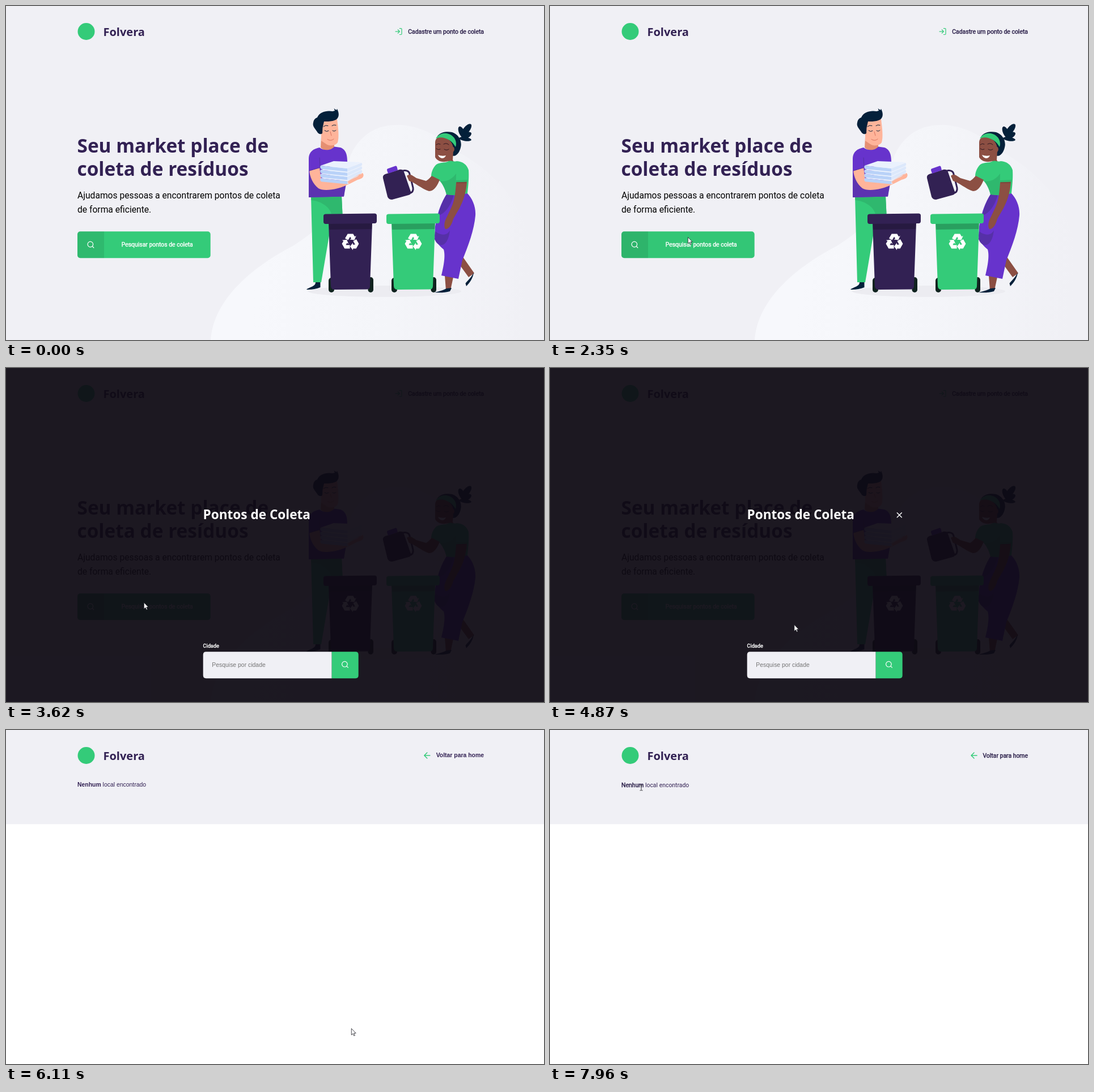
These frames come from a looping animation (949 by 590 pixels, 8000 ms). An HTML page:

```html
<!DOCTYPE html>
<html lang="pt-BR">
<head>
<meta charset="utf-8">
<title>Pontos de coleta</title>
<style>
html, body { margin: 0; width: 100%; height: 100%; overflow: hidden; background: #f0f0f5; }
svg { display: block; width: 100vw; height: 100vh; }
text { font: 10.43px Roboto, sans-serif; }
.title { font-family: "Open Sans", "Noto Sans", sans-serif; font-weight: 700; fill: #322153; }
.semi { stroke-width: .4px; }
.ink { fill: #322153; }
.link { fill: #261a45; stroke: #261a45; }
.white { fill: #fff; stroke: #fff; }
.arial, .arial text { font-family: "Liberation Sans", Arial, sans-serif; }
.end { text-anchor: end; }
.bold { font-weight: 700; }
.icon { fill: none; stroke-width: 2; stroke-linecap: round; stroke-linejoin: round; }
.face { fill: none; stroke-width: 1; stroke-linecap: round; }
</style>
</head>
<body>
<svg viewBox="0 0 949 590" preserveAspectRatio="none">
<defs>
  <linearGradient id="mist" gradientUnits="userSpaceOnUse" x1="440" y1="430" x2="925" y2="450">
    <stop offset="0" stop-color="#f7f8fc"/><stop offset=".5" stop-color="#f4f5f9"/><stop offset="1" stop-color="#f0f0f5"/>
  </linearGradient>
  <path id="turn" d="M-9.5-6.5-4.8-14.5H4.8L7.6-9.7 10.2-11 7-3.4-1.2-4.4 1.6-6-.4-9.6-4-3.4Z"/>
  <g id="recycle" fill="#fff">
    <use href="#turn"/><use href="#turn" transform="rotate(120)"/><use href="#turn" transform="rotate(240)"/>
  </g>
  <g id="bin">
    <g fill="#10231f"><rect x="569" y="480" width="10" height="26" rx="5"/><rect x="638.500" y="479" width="9.500" height="27" rx="4.700"/></g>
    <path d="M569 383 646 383 642 495Q642 500.500 636 500.500L580 501Q573.500 501 573 495Z"/>
    <path d="M569.500 384H645.500L645.200 394 570 395Z" fill="#000" fill-opacity=".22"/>
    <path d="M564 367.500 650 366.500Q654 366.500 654 370V380Q654 384 650 384L564 385Q560 385 560 381V371Q560 367.500 564 367.500Z"/>
    <use href="#recycle" x="607.500" y="417"/>
  </g>
  <path id="search" d="M11 3a8 8 0 1 0 0 16a8 8 0 0 0 0-16M21 21l-4.350-4.350"/>
  <g id="brand">
    <circle cx="141.500" cy="45" r="15" fill="#34cb79"/>
    <text class="title" x="171.500" y="53" style="font-size:20px">Folvera</text>
  </g>
</defs>

<g id="home">
  <rect width="949" height="590" fill="#f0f0f5"/>
  <path fill="url(#mist)" d="M361 590C366 520 430 465 500 427C600 372 588 300 612 255C632 222 658 210 692 210C745 212 770 240 805 262C870 300 905 350 920 400C945 480 925 540 908 590Z"/>
  <use href="#brand"/>
  <path class="icon" stroke="#34cb79" transform="translate(685.200 37.700) scale(.61)" d="M15 3h4a2 2 0 0 1 2 2v14a2 2 0 0 1-2 2h-4M10 17l5-5-5-5M15 12H3"/>
  <text class="link semi end" x="843" y="48.500">Cadastre um ponto de coleta</text>
  <g class="title" style="font-size:33.400px">
    <text class="title" x="125.500" y="259" style="font-size:33.400px">Seu market place de</text>
    <text class="title" x="125.500" y="300" style="font-size:33.400px">coleta de resíduos</text>
  </g>
  <text x="126" y="340" style="font-size:15.650px">Ajudamos pessoas a encontrarem pontos de coleta</text>
  <text x="126" y="364.800" style="font-size:15.650px">de forma eficiente.</text>
  <rect id="button" x="126" y="398.300" width="234.700" height="46.900" rx="5"/>
  <path d="M131 398.300H173V445.200H131Q126 445.200 126 440.200V403.300Q126 398.300 131 398.300Z" fill-opacity=".09"/>
  <use href="#search" class="icon" stroke="#fff" transform="translate(142.200 414.400) scale(.6)"/>
  <text class="white semi" x="266.700" y="425" text-anchor="middle">Pesquisar pontos de coleta</text>

  <ellipse cx="668" cy="504" rx="135" ry="10" fill="#ececf1"/>

  <!-- man -->
  <path fill="#34cb79" d="M538 335H592L595 400H571L556 488H542Z"/>
  <path fill="#2fb86e" d="M538 336H592L593.500 367H574C570 354 556 345 538.500 343Z"/>
  <path fill="#04203a" d="M546 488H554.500V497C547 500 538 501.500 530 501C535 496 546 496 546 488Z"/>
  <path fill="#e58f72" d="M556 232H579V250C574 257 561 257 555 250Z"/>
  <path fill="#ffb49a" d="M556 201 584 200C586 215 588 232 585 241C582 247 570 248 565 244L556 238Z"/>
  <path fill="#6733cc" d="M553 250C543 252 534 257 534 270V338L596 336.500 602 275C602 260 598 253 590 250L579 248.500C573 256 560 256 553 250Z"/>
  <path fill="#5c33b0" d="M535 296C545 318 570 325 600 314L596 336.500 534 338Z"/>
  <path fill="#04203a" d="M550 224C546 217 540 213 542 206C543 200 546 198 549 197C553 187 566 184 576 186L580 185 578.500 181 583 184 584 181.500C586 186 588 191 586 196C583 204 571 204 561 204L558.500 215 558 225Q554 228 550 224Z"/>
  <g class="face" stroke="#04203a"><path d="M560 213Q564 209.500 568 211.500M575 211.500Q578 209 582 210.500M562 220Q565.500 223 569 220.500M576 220Q579 222.500 582 219.500"/>
    <path stroke="#d9735f" d="M567 235.500Q573 239.500 578 235M572 222 574 229"/></g>
  <path fill="#ffb49a" d="M535 290 553 285 556 307C570 312 590 310 605 303L629 295C633 302 628 305 620 307L606 314C585 325 560 328 551 322C541 314 536 302 535 290Z"/>
  <path fill="#6733cc" d="M534 272 554 268 556 284.500 535 291.500Z"/>
  <path class="face" stroke="#5330a3" d="M535 291 554 285.500M553 268 554 284"/>
  <g id="towels"></g>
  <path fill="#ffb49a" d="M602 311C610 304 620 303 623 298L630 296C632 302 627 305 621 306L606 314Z"/>

  <!-- woman -->
  <path fill="#8c4f43" d="M805 442 826 472 816 479 800 457ZM774 476 789 479 784 502H776Z"/>
  <path fill="#04203a" d="M756 506C764 504 772 502 777 499L786 498 783 504C775 506.500 765 506.500 756 506ZM825 471C824 480 818 489 812 495L810.500 490C814 485 819 482 825 471Z"/>
  <path fill="#6733cc" d="M777 333 813 330C823 340 829 355 828 370C826 395 815 425 805 449L798 482 768 476C773 455 775 440 772 430C762 422 757 414 756 406L757 390C760 366 769 345 777 333Z"/>
  <path fill="#5630a8" d="M777 333 790 332.500C786 350 776 366 763 370C765 355 771 343 777 333ZM783 396C779 405 768 407 757 398L756 412C764 430 780 425 783 396Z"/>
  <g fill="#04203a">
    <path d="M760 232C764 223 776 221 787 223C799 227 805 239 802 250C799 262 792 267 786 264Z"/>
    <ellipse cx="812" cy="219" rx="13" ry="5.500" transform="rotate(-52 812 219)"/>
    <ellipse cx="804" cy="223" rx="11" ry="5" transform="rotate(66 804 223)"/>
    <ellipse cx="812" cy="229" rx="10" ry="5" transform="rotate(-30 812 229)"/>
    <ellipse cx="810" cy="235" rx="11" ry="3.500" transform="rotate(8 810 235)"/>
  </g>
  <path fill="#8c4f43" d="M757 242C757 234 762 230 770 231C785 235 790 245 789 257L788 272 794 282 778 284 781 274C770 277 760 274 757 267Z"/>
  <path fill="#34cb79" d="M758 234C763 226 772 223 781 226C792 230 796 240 793 249C790 244 787 240 782 237C774 232 766 231 758 234Z"/>
  <path fill="#8c4f43" d="M785 249Q791 247 791 254Q789 260 785 258Z"/>
  <g class="face" stroke="#2c1720"><path d="M759 245Q762 242 766 244M772 244Q777 241 781 245M759 252Q762 255 766 253M773 253Q777 256 781 253"/></g>
  <path fill="#fff" d="M762 263Q769 266 776 264Q774 269 769 269Q764 268 762 263Z"/>
  <path fill="#34cb79" d="M781 274C785 272 790 276 795 274C806 275 813 280 816 290C817 305 815 320 814 331Q795 336 777 333C775 324 771 316 766 310C763 307 757 305 750 301C750 293 754 285 758 281C765 275 774 278 781 274Z"/>
  <path fill="#2fb86e" d="M766 309C779 312 789 303 794 296L793 334 777 333C775 324 771 316 766 309Z"/>

  <!-- jug -->
  <path fill="#322153" d="M669 297 694 289Q700 288 702 293L714 328Q715 333 710 334L681 342Q675 342 673 337L665 304Q664 299 669 297Z"/>
  <path fill="none" stroke="#322153" stroke-width="3" d="M697 292C704 289 710 291 711.500 295L718 321C719 327 716 330 711 331"/>
  <path fill="#6733cc" d="M673 287.500 687 282.500Q689 282 689.500 284L691 290 674 296 672 290Q671.500 288.500 673 287.500Z"/>

  <path fill="#8c4f43" d="M751 300 765 307C760 320 754 327 746 327C733 323 722 312 711 309L707 300C714 295 718 301 724 304L741 309C746 306 748 303 751 300ZM794 311 813 310C812 330 806 345 800 357L789 376C786 388 780 395 775 394C772 390 773 381 777 374L786 355C792 342 793 325 794 311Z"/>
  <path fill="#2fb86e" d="M794 308 814 307V310.500L794 311.500Z"/>
  <path class="face" stroke="#6f3a34" d="M795 312H812"/>

  <use href="#bin" fill="#322153"/>
  <use href="#bin" x="111" fill="#34cb79"/>
</g>

<g id="modal">
  <rect width="949" height="590" fill="#0e0a14" fill-opacity=".937"/>
  <text class="title" x="347.500" y="267" style="font-size:22.600px;fill:#fff">Pontos de Coleta</text>
  <path id="close" class="icon" style="stroke-width:1.500" stroke="#fff" d="M612.300 255.800 620.300 263.800M620.300 255.800 612.300 263.800"/>
  <text class="white semi" x="347.500" y="493.500" style="font-size:9.130px">Cidade</text>
  <path fill="#f0f0f5" d="M353 501.200H574.700V548.200H353Q347.700 548.200 347.700 543V506.400Q347.700 501.200 353 501.200Z"/>
  <text class="arial" x="363.300" y="528" fill="#757575">Pesquise por cidade</text>
  <path id="go" d="M574.700 501.200H616.500Q621.700 501.200 621.700 506.400V543Q621.700 548.200 616.500 548.200H574.700Z"/>
  <use href="#search" class="icon" stroke="#fff" transform="translate(590.800 516.600) scale(.6)"/>
  <g id="focus" fill="none"><rect x="573.500" y="500.500" width="49" height="49" rx="2.500" stroke="#fff"/><rect x="574.500" y="501.500" width="47" height="47" rx="2" stroke="#101010"/></g>
</g>

<g id="results">
  <rect width="949" height="590" fill="#fff"/>
  <rect width="949" height="166.300" fill="#f0f0f5"/>
  <use href="#brand"/>
  <path id="back" class="icon" stroke="#34cb79" d="M19 12H5M12 19l-7-7 7-7"/>
  <g id="plain" class="arial ink">
    <text class="end bold" x="843" y="48">Voltar para home</text>
    <text x="126" y="100"><tspan class="bold">Nenhum</tspan> local encontrado</text>
  </g>
  <g id="styled" class="ink">
    <text class="link semi end" x="843" y="49">Voltar para home</text>
    <text x="126" y="101"><tspan class="link semi">Nenhum</tspan> local encontrado</text>
  </g>
</g>

<g id="cursor">
  <circle id="press" r="8" fill="#ff0" fill-opacity=".47"/>
  <path id="arrow" fill="#fff" stroke="#1c1c24" stroke-width=".8" stroke-linejoin="round" d="M.3.3V11.700L3 9.300 4.700 13.200 6.500 12.400 4.800 8.600H8.200Z"/>
  <path id="beam" fill="none" stroke="#26262c" stroke-width=".9" d="M-2.500-4.800H-.6L0-4.200.6-4.800H2.500M0-4.200V4.200M-2.500 4.800H-.6L0 4.200.6 4.800H2.500"/>
</g>
</svg>
<script>
const LOOP = 8000;
const $ = id => document.getElementById(id);
const show = (id, on) => $(id).setAttribute('display', on ? 'inline' : 'none');
const clamp = v => Math.min(1, Math.max(0, v));
const ramp = (t, a, b) => clamp((t - a) / (b - a));
const mix = (a, b, p) => a + (b - a) * p;
const inside = ([x, y], l, t, r, b) => x > l && x < r && y > t && y < b;
const green = p => `rgb(${mix(52, 47, p)},${mix(203, 184, p)},${mix(121, 110, p)})`;

// start, steps, step length, destination
const moves = [
  [500, 10, 80, 185, 239],
  [1510, 10, 80, 243, 407],
  [2350, 4, 60, 243, 414],
  [4370, 2, 80, 348, 419],
  [4650, 8, 75.7, 609, 527],
  [6420, 11, 77, 219, 137],
  [7260, 10, 77.7, 161, 102]
];

function pointer(t) {
  let x = -1, y = 18;
  for (const [start, steps, len, tx, ty] of moves) {
    if (t < start) break;
    const p = Math.min(1, (Math.floor((t - start) / len + 1e-6) + 1) / steps);
    const e = p * p * (3 - 2 * p);
    x = mix(x, tx, e);
    y = mix(y, ty, e);
  }
  return [x, y];
}

function drawTowels() {
  let s = '';
  for (let i = 3; i >= 0; i--) {
    const y = i * 7.4;
    s += `<path fill="#b9d2f8" d="M555 ${282 + y}L602 ${287 + y}V${292.5 + y}L556 ${288 + y}Q553 ${285 + y} 555 ${282 + y}Z"/>` +
      `<path fill="#dce8fb" d="M602 ${287 + y}L627 ${277 + y * .85}Q630 ${280 + y * .85} 626 ${283 + y * .85}L602 ${292.5 + y}Z"/>` +
      `<path fill="#eaf1fd" d="M555 ${282 + y}L578 ${274 + y}L627 ${276 + y * .85}L602 ${287 + y}Z"/>`;
  }
  $('towels').innerHTML = s;
}

function render(t) {
  const modal = t >= 3620 && t < 6110, results = t >= 6110, styled = t >= 6190;
  show('home', !results);
  show('modal', modal);
  show('results', results);
  show('close', t >= 3700);
  show('focus', t >= 5480);
  show('plain', !styled);
  show('styled', styled);
  $('button').setAttribute('fill', green(ramp(t, 2290, 2530) - ramp(t, 3620, 3780)));
  $('go').setAttribute('fill', green(ramp(t, 4980, 5180)));
  $('back').setAttribute('transform', `translate(${styled ? 739.4 : 734.2} 36.400) scale(.72)`);

  const at = pointer(t);
  const beam = results ? inside(at, 126, 88, 246, 110)
    : modal ? inside(at, 348, 501, 574, 548)
    : inside(at, 126, 230, 484, 372);
  show('cursor', t >= 500);
  show('arrow', !beam);
  show('beam', beam);
  show('press', t >= 3150 && t < 3470 || t >= 5480 && t < 5780);
  $('cursor').setAttribute('transform', `translate(${at[0]} ${at[1]})`);
}

drawTowels();
const begin = performance.now();
function tick() {
  render((performance.now() - begin) % LOOP);
  requestAnimationFrame(tick);
}
tick();
</script>
</body>
</html>
```
